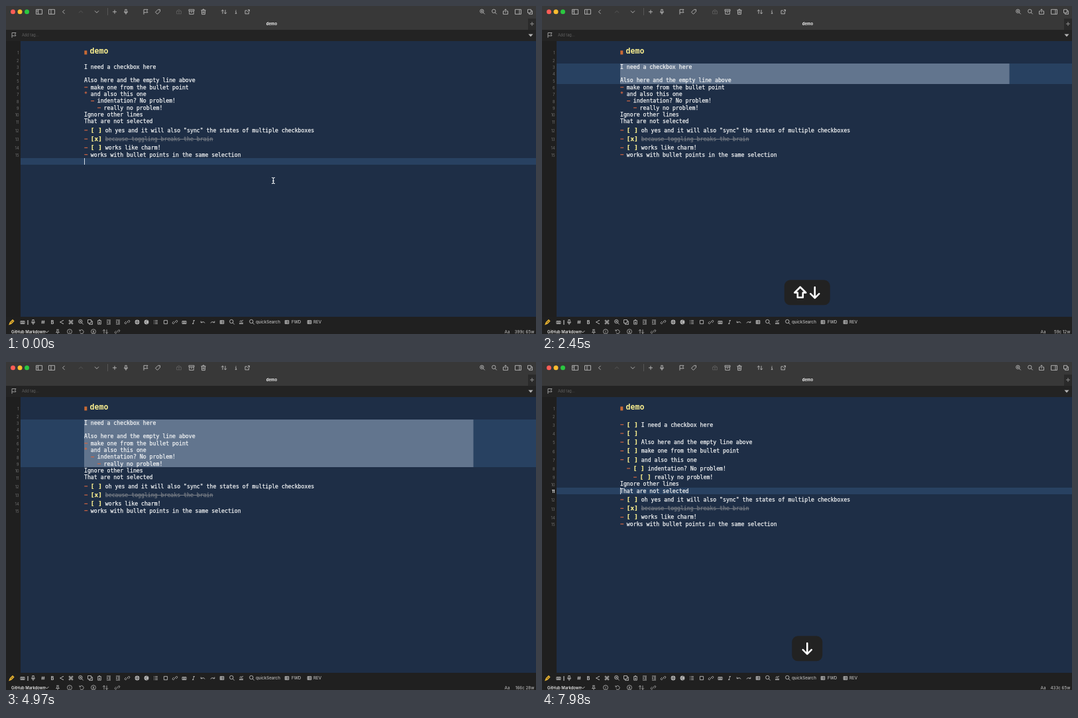
An HTML page with a canvas for the animation above (8 s loop, 800 px wide and 496 px high).

```html
<!DOCTYPE html>
<html lang="en">
<head>
<meta charset="utf-8">
<title>demo</title>
<style>
html, body { margin: 0; width: 800px; height: 496px; overflow: hidden; background: #1e2e46; }
canvas { display: block; }
</style>
</head>
<body>
<canvas id="stage" width="800" height="496"></canvas>
<script>
const ctx = document.getElementById('stage').getContext('2d');
const LOOP = 8000, LEFT = 118, CHAR = 8.2, ROW = 10.35, BOX_ROW = 13.25;
const MONO = '"DejaVu Sans Mono", monospace', SANS = 'Inter, "Liberation Sans", sans-serif';
const YELLOW = '#f7ec8e', ORANGE = '#cf6543', WHITE = '#f1f3f4';

const plain = `# demo

I need a checkbox here

Also here and the empty line above
- make one from the bullet point
* and also this one
  - indentation? No problem!
    - really no problem!
Ignore other lines
That are not selected
- [ ] oh yes and it will also "sync" the states of multiple checkboxes
- [x] because toggling breaks the brain
- [ ] works like charm!
- works with bullet points in the same selection
`.split('\n');
const boxed = plain.map((s, i) =>
  i > 1 && i < 9 ? s.replace(/^( *)([-*] )?/, '$1- [ ] ') : s);

// Each step: time, caret line, pressed keys, selected lines (3 to last), document
const steps = [
  { t: 0, line: 16 },
  { t: 350, line: 1 },
  { t: 630, line: 2, keys: '↓' },
  { t: 980, line: 3, keys: '↓' },
  ...Array.from({ length: 7 }, (_, i) => ({ t: 1610 + i * 341, last: 3 + i, keys: '⇧↓' })),
  { t: 5300, last: 9, doc: boxed },
  { t: 6900, line: 10, keys: '↓', doc: boxed },
  { t: 7400, line: 11, keys: '↓', doc: boxed },
];

const icons = {
  sidebar: 'M-4.5-3.5h9v7h-9zM-1.5-3.5v7M-3.5-1.5h1M-3.5 0h1',
  panel: 'M-4.5-3.5h9v7h-9zM-1-3.5v7',
  rpanel: 'M-4.5-3.5h9v7h-9zM2-3.5v7',
  left: 'M1.5-3l-3 3l3 3',
  up: 'M-3 1.5l3-3l3 3',
  down: 'M-3-1.5l3 3l3-3',
  plus: 'M-3 0h6M0-3v6',
  mic: 'M-1.2-3.5h2.4v4h-2.4zM-2.5-.5q0 2.5 2.5 2.5t2.5-2.5M0 2v2',
  flag: 'M-3 4v-7.5h6l-1.5 2.2l1.5 2.3h-6',
  tag: 'M-3.5.5l4-4h3v3l-4 4zM1.5-2v.5',
  cube: 'M-3.5-1l3.5-2.5l3.5 2.5v4h-7zM-3.5-1h7M0-1v4',
  archive: 'M-4-3.5h8v2.2h-8zM-3.2-1.3v4.8h6.4v-4.8M-1 .5h2',
  trash: 'M-3.5-2.5h7M-1-2.5v-1.3h2v1.3M-2.7-2.5l.4 6.3h4.6l.4-6.3M-.8-1v3.3M.8-1v3.3',
  swap: 'M-2 3v-6l-2 2M-2-3l1.5 2M2-3v6l2-2M2 3l-1.5-2',
  info: 'M-1-.5h1.2v3M-1.2 2.5h2.6M.1-2.8v1',
  out: 'M0-2h-3v5h5.5v-3M0 .5l3.5-3.5h-2.5M3.5-3v2.5',
  search: 'M2-1a2.7 2.7 0 1 1-5.4 0a2.7 2.7 0 1 1 5.4 0M1.2 1l2.5 2.5',
  zoom: 'M2-1a2.7 2.7 0 1 1-5.4 0a2.7 2.7 0 1 1 5.4 0M1.2 1l2.5 2.5M-2-1h2.6M-.7-2.3v2.6',
  share: 'M-1.5-1h-2v4.5h7v-4.5h-2M0 1v-5l-1.7 1.7M0-4l1.7 1.7',
  copy: 'M-3.5-3.5h5v5h-5zM1.5-1.5h2v5h-5v-2',
  tray: 'M-3-1.5h6v4h-6zM-2 0h4M-2 1.2h4',
  hash: 'M-1-2.5l-.6 5M1.5-2.5l-.6 5M-2.5-1h5M-2.7 1h5',
  nodes: 'M2.5-2.5l-5 2.5l5 2.5M1.5-2.5h1.5M1.5 2.5h1.5',
  command: 'M-1-1h2v2h-2zM-1-1h-1q-1 0-1-1t1-1t1 1zM1-1v-1q0-1 1-1t1 1t-1 1zM1 1h1q1 0 1 1t-1 1t-1-1zM-1 1v1q0 1-1 1t-1-1t1-1z',
  clip: 'M-2.3-2.5h4.6v5.7h-4.6zM-1-3.3h2M-1 0h2M-1 1.5h2',
  indent: 'M-3-3h6M0-1h3M0 1h3M-3 3h6M-3-1.3l1.8 1.3l-1.8 1.3',
  link: 'M-.5 1l-1.3 1.3q-1 .7-1.7-.2t.2-1.7l1.5-1.5M.5-1l1.3-1.3q1-.7 1.7.2t-.2 1.7l-1.5 1.5M-1 1l2-2',
  list: 'M-3-2.3h1M-3 0h1M-3 2.3h1M-1-2.3h4M-1 0h4M-1 2.3h4',
  square: 'M-2.6-2.6h5.2v5.2h-5.2z',
  italic: 'M-.5-2.5h2.5M-2 2.5h2.5M.8-2.5l-1.6 5',
  undo: 'M3 1.5q-1-3-5.5-1M-2.8-1.5v2.2h2.2',
  redo: 'M-3 1.5q1-3 5.5-1M2.8-1.5v2.2h-2.2',
  grid: 'M-2.8-2.5h5.6v5h-5.6zM-2.8-.8h5.6M-2.8.9h5.6M-1-2.5v5',
  chart: 'M-3 2.5h6M-2 2.5v-2M0 2.5v-3.5M2 2.5v-2.5M-2.5-.8l2-1.5l1.5.8l2-1.5',
  pin: 'M-1.7-3h3.4M-1-3v3l-1.5 1.2h5l-1.5-1.2v-3M0 1.2v2.5',
  ring: 'M3.5 0a3.5 3.5 0 1 1-7 0a3.5 3.5 0 1 1 7 0M0-.7v2.5M0-2v.5',
  person: 'M3.5 0a3.5 3.5 0 1 1-7 0a3.5 3.5 0 1 1 7 0M-1.5 2q1.5-2 3 0M-.6-1h1.2v1h-1.2z',
  back: 'M-2.5-1.5q2-2.5 4.5-.5t.3 4.5t-4.6-1M-3-3v2h2',
  pencil: 'M-3 3l1-2.5l3.5-3.5l1.5 1.5l-3.5 3.5z',
};
for (const k in icons) icons[k] = new Path2D(icons[k]);

function rect(x, y, w, h, color) {
  ctx.fillStyle = color;
  ctx.fillRect(x, y, w, h);
}

// weight adds a thin outline for a heavier stem
function text(s, x, y, font, color, align = 'left', weight = 0) {
  ctx.font = font;
  ctx.fillStyle = ctx.strokeStyle = color;
  ctx.textAlign = align;
  ctx.fillText(s, x, y);
  if (!weight) return;
  ctx.lineWidth = weight;
  ctx.strokeText(s, x, y);
}

function dot(x, y, r, color) {
  ctx.fillStyle = color;
  ctx.beginPath();
  ctx.arc(x, y, r, 0, 7);
  ctx.fill();
}

function icon(name, x, y, color = '#bcbcbc', width = 0.9) {
  ctx.save();
  ctx.translate(x, y);
  ctx.strokeStyle = color;
  ctx.lineWidth = width;
  ctx.stroke(icons[name]);
  ctx.restore();
}

const row = (list, y, color) => list.forEach(([name, x]) => icon(name, x, y, color));

function drawTop() {
  rect(0, 0, 800, 36, '#383838');
  rect(788, 19, 12, 17, '#2a2a2a');
  rect(0, 36, 800, 17, '#232323');
  dot(10.5, 8.8, 3.5, '#fb5d56');
  dot(21, 8.8, 3.5, '#fbbc2f');
  dot(31.5, 8.8, 3.5, '#2bc840');
  row([['sidebar', 50], ['panel', 69], ['left', 87], ['down', 137], ['plus', 164], ['mic', 181],
    ['flag', 211], ['tag', 229], ['archive', 280], ['trash', 298], ['swap', 329], ['info', 347],
    ['out', 364], ['zoom', 719], ['search', 737], ['share', 754], ['rpanel', 773], ['copy', 791]], 8.8);
  row([['up', 113], ['cube', 261]], 8.8, '#5c5c5c');
  rect(153, 3, 1, 11, '#575757');
  text('demo', 401, 28.7, `700 6px ${SANS}`, '#f0f0f0', 'center');
  icon('plus', 794, 27, '#999');
  icon('flag', 12, 44, '#aaa');
  text('Add tag...', 24, 46, `5.6px ${SANS}`, '#626262');
  ctx.fillStyle = '#b5b5b5';
  ctx.fill(new Path2D('M788.5 42.5h7l-3.5 4z'));
}

function drawBottom(doc, step) {
  rect(0, 470, 800, 26, '#202020');
  icon('pencil', 8.5, 478, '#efb72f', 1.6);
  row([['tray', 25], ['mic', 41], ['hash', 56], ['nodes', 84], ['command', 98], ['zoom', 113],
    ['copy', 127], ['clip', 141], ['indent', 155], ['indent', 169], ['link', 183], ['list', 226],
    ['square', 241], ['link', 255], ['tray', 269], ['italic', 283], ['undo', 297], ['redo', 312],
    ['grid', 326], ['search', 341], ['chart', 355], ['search', 371], ['grid', 424], ['grid', 458]], 478);
  rect(32.5, 475, 1, 7, '#ddd');
  text('B', 70, 480.5, `700 7px ${SANS}`, '#c8c8c8', 'center');
  dot(198, 478, 3.4, '#b8b8b8');
  dot(212, 478, 3.4, '#b8b8b8');
  icon('plus', 198, 478, '#333', 0.7);
  icon('left', 212, 478, '#333', 0.7);
  const label = `500 6.2px ${SANS}`;
  text('quickSearch', 377, 480.2, label, '#bcbcbc');
  text('FWD', 431, 480.2, label, '#bcbcbc');
  text('REV', 464, 480.2, label, '#bcbcbc');
  text('GitHub Markdown', 8, 494.5, `600 5.9px ${SANS}`, '#e4e4e4');
  icon('down', 61.5, 492.5, '#ddd', 0.8);
  row([['pin', 78], ['ring', 96], ['back', 114], ['person', 132], ['swap', 150], ['link', 168]], 492.3, '#aaa');
  text('Aa', 756.5, 494.7, label, '#b0b0b0', 'center');

  let part = doc.join('\n');
  if (step.last) part = doc.slice(2, step.last).join('\n') + (step.doc ? '' : '\n');
  const words = (part.match(/\w+/g) || []).length;
  text(`${part.length}c ${words}w`, 797.3, 494.7, label, '#b8b8b8', 'right');
}

function drawLine(s, base) {
  if (s.startsWith('# ')) {
    rect(118.3, base - 5, 4, 6, '#c96a35');
    text(s.slice(2), 126.5, base, `700 11.6px ${MONO}`, YELLOW);
    return;
  }
  const [, pad, mark, box, body] = s.match(/^( *)([-*] )?(\[.\] ?)?(.*)$/);
  const font = `${CHAR}px ${MONO}`;
  const advance = CHAR * 0.602;
  let x = LEFT + pad.length * advance;
  if (mark) {
    if (mark[0] === '-') rect(x + 0.3, base - 3.4, 4.9, 1.2, ORANGE);
    else text(mark, x, base, `700 ${font}`, ORANGE);
    x += 2 * advance;
  }
  if (box) {
    text(box.trim(), x, base, `700 9.4px ${MONO}`, YELLOW, 'left', 0.25);
    x += 3 * 9.4 * 0.602 + advance;
  }
  const done = box && box[1] === 'x';
  text(body, x, base, font, done ? '#737982' : WHITE, 'left', 0.25);
  if (done) rect(x, base - 3, body.length * advance, 1, '#7d8289');
}

function drawEditor(doc, step) {
  rect(0, 53, 22, 417, '#1f1f1f');
  rect(22, 53, 778, 417, '#1e2e46');
  let y = 61;
  doc.forEach((s, i) => {
    const n = i + 1;
    const h = n === 1 ? 15.2 : /\[.\]/.test(s) ? BOX_ROW : ROW;
    const top = y;
    const current = step.line === n;
    const selected = n > 2 && n <= step.last;
    y += h;
    // Adjoining selected rows share whole-pixel edges
    const edge = Math.round(top), high = Math.round(y) - edge;
    if (current || selected) rect(22, edge, 778, high, '#284161');
    if (selected) rect(LEFT, edge, step.doc && n === 9 ? 141 : 587.5, high, '#62758e');
    if (current) rect(LEFT, edge, 1, high, '#d5dce6');
    if (n < 16) {
      text(n, 19.5, y - (n === 1 ? 3 : 2), `${current ? 700 : 400} 5.6px ${SANS}`,
        current ? '#f2f2f2' : '#737373', 'right');
    }
    drawLine(s, y - (n === 1 ? 3.8 : 2.3));
  });
}

function drawPointer() {
  ctx.strokeStyle = '#e4e8ec';
  ctx.lineWidth = 1.2;
  ctx.stroke(new Path2D('M401 259.5q2.5 0 2.5 1.5q0-1.5 2.5-1.5M403.5 261v6M401 268.5q2.5 0 2.5-1.5q0 1.5 2.5 1.5M402 264.5h3'));
}

const arrow = new Path2D('M0-8v16M-6.5 1.8l6.5 6.5l6.5-6.5');
const shift = new Path2D('M0-8.3l8.5 8.5h-4.5v7.3h-8v-7.3h-4.5z');

function drawKeys(keys, age) {
  const alpha = Math.min(1, (1000 - age) / 200);
  if (!keys || alpha <= 0) return;
  const scale = 0.8 + 0.2 * Math.min(1, age / 130);
  const w = keys.length > 1 ? 69 : 46;
  ctx.save();
  ctx.globalAlpha = alpha;
  ctx.translate(400.3, 433.3);
  ctx.scale(scale, scale);
  ctx.fillStyle = '#222222';
  ctx.beginPath();
  ctx.roundRect(-w / 2, -19, w, 38, 9);
  ctx.fill();
  ctx.strokeStyle = '#fff';
  ctx.lineWidth = 2.6;
  ctx.lineCap = ctx.lineJoin = 'round';
  if (keys.length > 1) {
    ctx.translate(-10.5, 0);
    ctx.stroke(shift);
    ctx.translate(22, 0);
  }
  ctx.stroke(arrow);
  ctx.restore();
}

const start = performance.now();
function frame() {
  const t = (performance.now() - start) % LOOP;
  const step = steps.findLast(s => s.t <= t);
  const doc = step.doc || plain;
  drawEditor(doc, step);
  drawTop();
  drawBottom(doc, step);
  if (t < 350) drawPointer();
  const press = steps.findLast(s => s.t <= t && s.keys);
  if (press) drawKeys(press.keys, t - press.t);
  requestAnimationFrame(frame);
}
frame();
</script>
</body>
</html>
```
